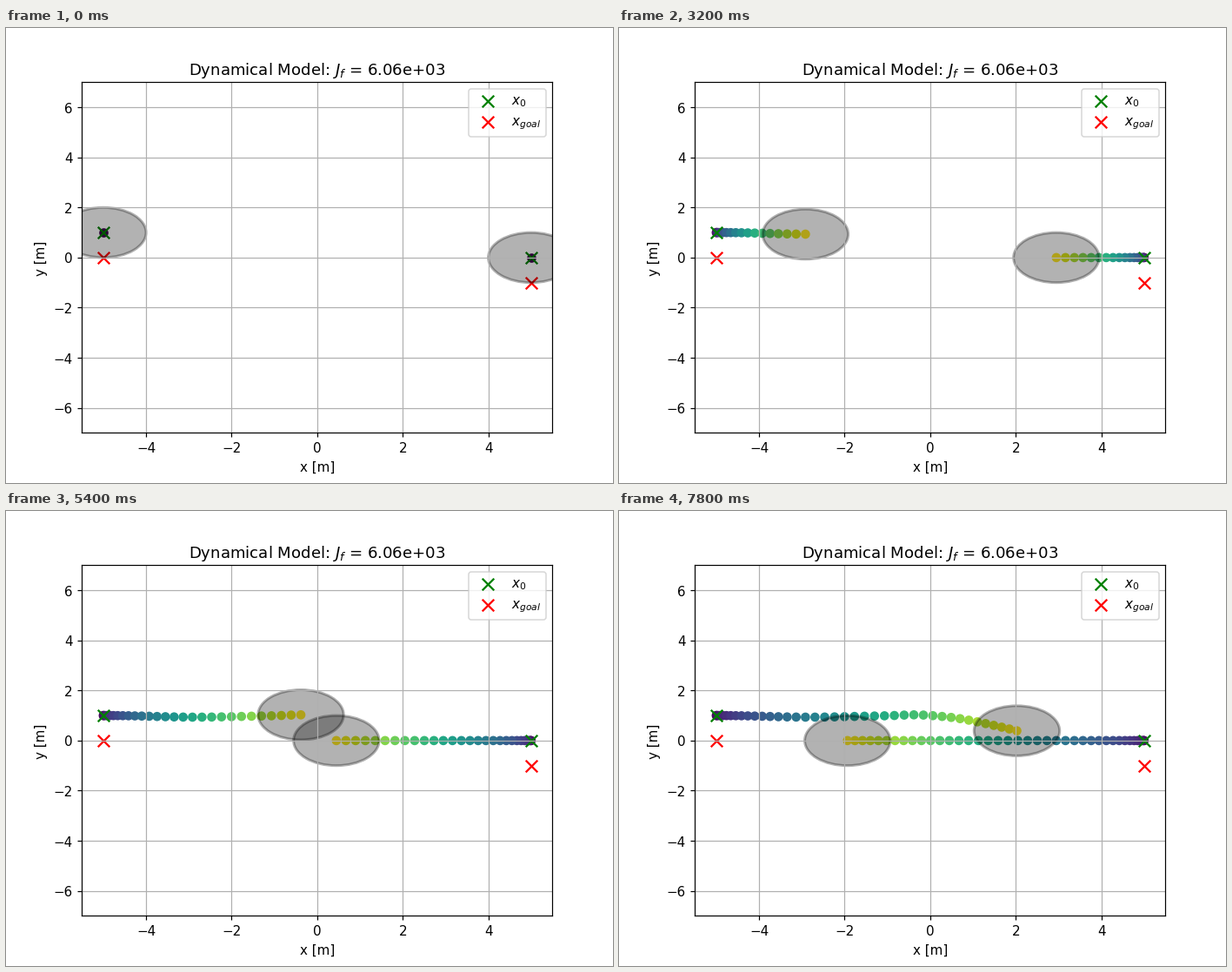
Animation, 698 px wide and 523 px high, one loop 8000 ms. Source, as a matplotlib script:

```python
import numpy as np
import matplotlib.pyplot as plt
from matplotlib.animation import FuncAnimation

W, H, DPI = 698, 523, 109.1
FRAMES, INTERVAL = 40, 200


def run(u, accel, drag):
    """Distance covered: starts from rest, then slows down."""
    return accel * u ** 2 / (1 + drag * u ** 2)


def bump(u, center, width):
    return np.exp(-((u - center) / width) ** 2)


def ramp(u, start, softness):
    """Zero before start, then a straight climb, with a rounded corner."""
    return softness * np.log1p(np.exp((u - start) / softness))


u = np.arange(FRAMES) / FRAMES
sway = .035 * bump(u, .68, .05) - .065 * bump(u, .41, .15)
paths = [np.column_stack([-5 + run(u, 15.4, 1.14), 1 + sway - 2.9 * ramp(u, .765, .03)]),
         np.column_stack([5 - run(u, 15.15, 1.133), 0 * u])]
goals = [(-5, 0), (5, -1)]

# The fractions of a pixel set how lines snap; the canvas is W by H.
fig, ax = plt.subplots(figsize=((W + .24) / DPI, (H + .45) / DPI), dpi=DPI)
ax.set(xlim=(-5.5, 5.5), ylim=(-7, 7), xlabel="x [m]", ylabel="y [m]",
       title="Dynamical Model: $J_f$ = 6.06e+03")
ax.grid(True)

trails = []
for path, goal in zip(paths, goals):
    trails.append(ax.scatter(path[:1, 0], path[:1, 1], c=[0], cmap="viridis"))
    start = ax.scatter(*path[0], s=80, c="g", marker="x")
    end = ax.scatter(*goal, s=80, c="r", marker="x")
ax.legend([start, end], ["$x_0$", "$x_{goal}$"], loc="upper right")

discs = [ax.add_patch(plt.Circle(path[0], 1, color="k", alpha=.3, lw=2))
         for path in paths]


def update(n):
    for path, trail, disc in zip(paths, trails, discs):
        trail.set_offsets(path[:n + 1])
        trail.set_array(np.arange(n + 1))
        trail.set_clim(0, max(n, 1))
        disc.center = path[n]
    return trails + discs


anim = FuncAnimation(fig, update, frames=FRAMES, interval=INTERVAL,
                     repeat=True, repeat_delay=0)
plt.show()
```
